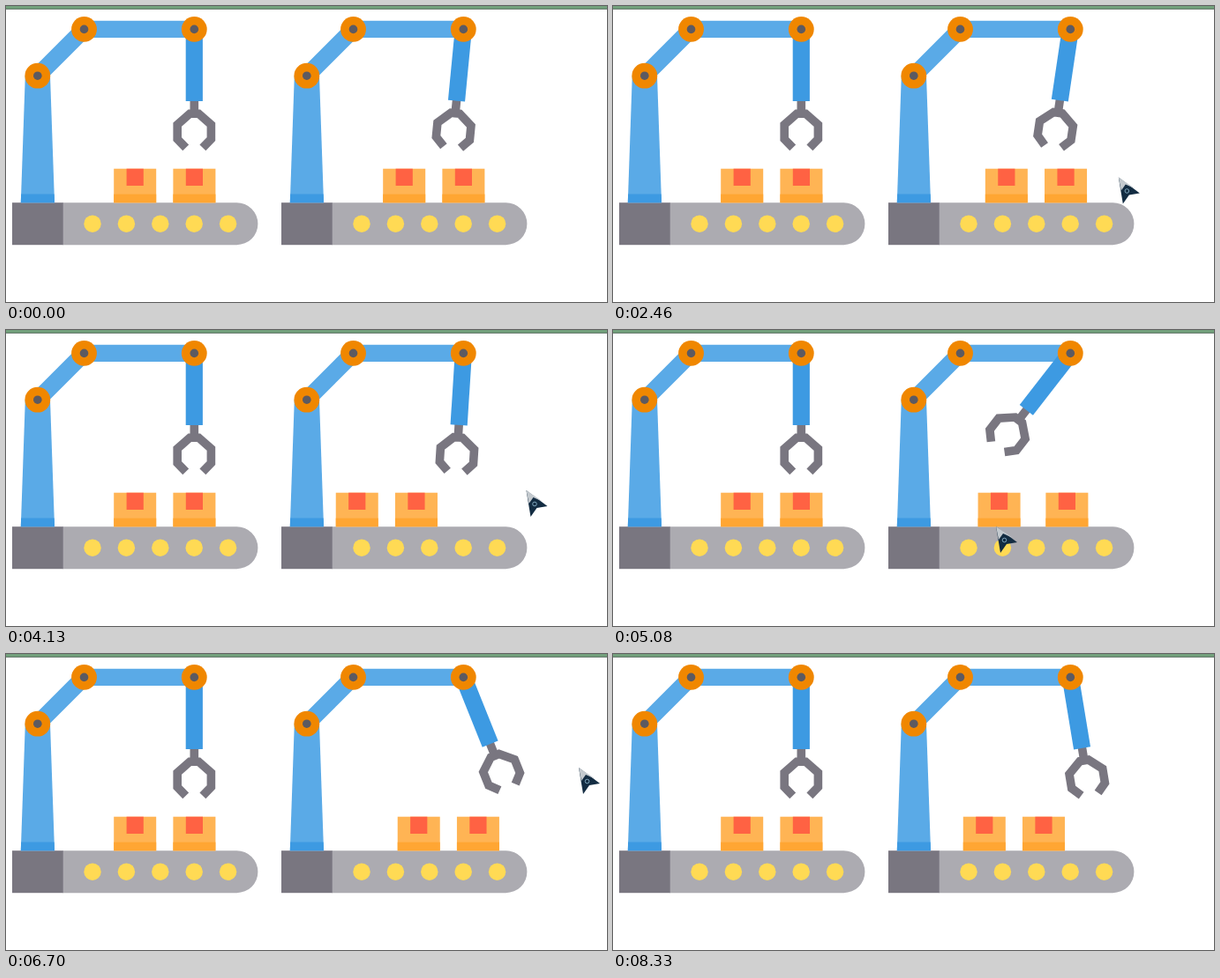
Recreate the animation shown at these times as an HTML page. Size 681 by 336 pixels, loop 8400 ms.

```html
<!DOCTYPE html>
<html lang="en">
<head>
<meta charset="utf-8">
<title>Robot arms</title>
<style>
  html, body { margin: 0; width: 100%; height: 100%; overflow: hidden; background: #fff; }
  svg { display: block; }
</style>
</head>
<body>
<svg id="stage" width="681" height="336" viewBox="0 0 681 336"></svg>
<script>
const LOOP = 8400;
const UNIT = 9.6;                           // grid step of the drawing
const CRANE_GAP = 305;
const SHOULDER = { x: 213.3, y: 26.4 };
const AIM = { x: 600.5, y: 8 };             // the moving arm turns as if the pointer hung from here

const FIRST_BOX = 122.2, BOX_GAP = 7 * UNIT;
const BELT_START = 64.9, BELT_LENGTH = 15 * UNIT; // boxes wrap inside this stretch
const BELT_DELAY = 2275, BELT_SPEED = 3 * UNIT / 1000;

// The pointer eases from stop to stop.
const STOPS = [
  { at: 150, x: 568.5, y: 341 },
  { at: 600, x: 520, y: 195 },
  { at: 1340, x: 645, y: 123 },
  { at: 2360, x: 571, y: 196 },
  { at: 3400, x: 640, y: 138 },
  { at: 4130, x: 589.5, y: 182 },
  { at: 5080, x: 434, y: 223 },
  { at: 6700, x: 649, y: 129 },
  { at: 7560, x: 656, y: 345 }
];

const rect = (x, y, w, h, fill) => `<rect x="${x}" y="${y}" width="${w}" height="${h}" fill="${fill}"/>`;
const disc = (x, y, r, fill) => `<circle cx="${x}" cy="${y}" r="${r}" fill="${fill}"/>`;
const joint = (x, y) => disc(x, y, 14.4, '#f08700') + disc(x, y, 4.8, '#5c5a61');
const repeat = (count, draw) => Array.from({ length: count }, (_, i) => draw(i)).join('');

const box = i => `<g class="box" transform="translate(${FIRST_BOX + i * BOX_GAP})">
  ${rect(0, 184.7, 48, 38.6, '#ffb454')}
  ${rect(0, 213.6, 48, 9.7, '#ffa633')}
  ${rect(14.4, 184.7, 19.2, 19.3, '#ff6243')}
</g>`;

const crane = (id, x) => `<g id="${id}" transform="translate(${x})">
  <path d="M64 223.2H261.4a24 24 0 0 1 0 48H64z" fill="#acabb1"/>
  ${rect(7, 223.2, 57.7, 48, '#797680')}
  ${repeat(5, i => disc(98 + i * 4 * UNIT, 247.2, 9.7, '#ffda54'))}
  ${repeat(2, box)}
  <path d="M21.8 79H50L55 223.2H16.8z" fill="#5aaae7"/>
  <path d="M17.1 213.6H54.7L55 223.2H16.8z" fill="#3d9ae2"/>
  <path d="M35.8 79.2L88.5 26.4H213.3" fill="none" stroke="#5aaae7" stroke-width="19.2"/>
  <g class="forearm">
    ${rect(208.5, 106, 9.6, 14, '#797680')}
    ${rect(203.7, 26.4, 19.2, 81.6, '#3d9ae2')}
    <path d="M203.7 160.8L194.2 151V134.6L208.3 122.2H218.3L232.4 134.6V151L222.9 160.8"
      fill="none" stroke="#797680" stroke-width="9.6"/>
  </g>
  ${joint(35.8, 79.2)}${joint(88.5, 26.4)}${joint(SHOULDER.x, SHOULDER.y)}
</g>`;

const pointerShape = `<g id="pointer">
  <path d="M0 0L24 18L12 20L5 30z" fill="#132c42"/>
  <path d="M0 0L19 13L8 8L3 15z" fill="#c3c9ce"/>
  <circle cx="9.5" cy="15.5" r="2.3" fill="none" stroke="#7fa6bd"/>
</g>`;

const stage = document.getElementById('stage');
stage.innerHTML = rect(0, 0, 681, 3, '#72a07b') + rect(0, 3, 681, 1, '#64796a')
  + crane('still', 0) + crane('moving', CRANE_GAP) + pointerShape;

const forearm = stage.querySelector('#moving .forearm');
const boxes = stage.querySelectorAll('#moving .box');
const pointer = stage.querySelector('#pointer');

const modulo = (value, size) => (value % size + size) % size;
const smooth = p => p * p * (3 - 2 * p);

function pointerAt(time) {
  const next = STOPS.findIndex(stop => stop.at > time);
  if (next === 0) return STOPS[0];
  if (next < 0) return STOPS[STOPS.length - 1];
  const from = STOPS[next - 1], to = STOPS[next];
  const part = smooth((time - from.at) / (to.at - from.at));
  return { x: from.x + (to.x - from.x) * part, y: from.y + (to.y - from.y) * part };
}

function draw(time) {
  const { x, y } = pointerAt(time);
  const angle = Math.atan2(AIM.x - x, y - AIM.y) * 180 / Math.PI;
  pointer.setAttribute('transform', `translate(${x} ${y})`);
  forearm.setAttribute('transform', `rotate(${angle} ${SHOULDER.x} ${SHOULDER.y})`);

  const travel = Math.max(0, time - BELT_DELAY) * BELT_SPEED;
  boxes.forEach((element, i) => {
    const distance = FIRST_BOX + i * BOX_GAP - BELT_START - travel;
    element.setAttribute('transform', `translate(${BELT_START + modulo(distance, BELT_LENGTH)})`);
  });
}

const start = performance.now();
function tick() {
  draw((performance.now() - start) % LOOP);
  requestAnimationFrame(tick);
}
tick();
</script>
</body>
</html>
```
